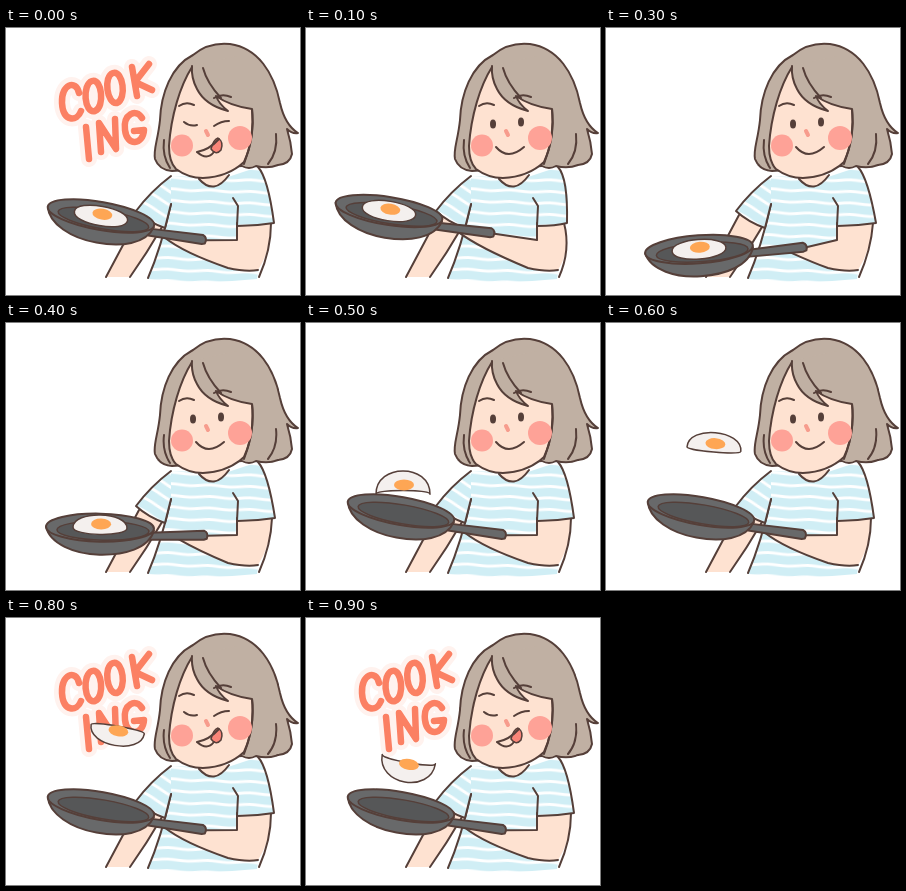
These frames come from a looping animation (294x267 px, 1000 ms). An HTML page:

```html
<!DOCTYPE html>
<html lang="en">
<head>
<meta charset="utf-8">
<title>Cooking</title>
<style>
  html, body { margin: 0; width: 100%; height: 100%; overflow: hidden; background: #fff; }
  svg { display: block; width: 100vw; height: 100vh; }
  svg * { stroke-linecap: round; stroke-linejoin: round; }
  path { fill: none; }
  .line { stroke: #553f39; stroke-width: 2; }
  .thin { stroke-width: 1.5; }
  .skin { fill: #fee2d1; }
  .hair { fill: #c0b0a3; }
  .steel { fill: #68696a; }
  .well { fill: #565758; }
  .blush { fill: #fea297; }
  .eye { fill: #553f39; }
  .tongue { fill: #fa8578; }
  .cloth { fill: url(#stripes); }
  .slant { fill: url(#slant); }
  .white { fill: #f4f0ee; }
</style>
</head>
<body>
<svg viewBox="0 0 294 267">
  <defs>
    <pattern id="stripes" width="40" height="11.5" patternUnits="userSpaceOnUse" patternTransform="rotate(2)">
      <path style="fill:#d0eef5" d="M0 0H40V12H0Z"/>
      <path d="M0 6Q10 4.5 20 6T40 6" stroke="#fff" stroke-width="3"/>
    </pattern>
    <pattern id="slant" href="#stripes" patternTransform="rotate(29)"/>
    <path id="word" d="M73 65C70 51 55 56 56 75C57 94 71 94 75 83
      M86 53C76 56 78 86 89 83C99 79 96 50 86 53
      M107 45C97 48 101 77 111 75C121 71 117 42 107 45
      M126 39L131 68M143 36L129 54L146 62
      M80 99L83 131M95 124L93 95L110 121L109 91
      M136 90C130 80 117 86 119 102C121 119 137 117 138 102L128 103"/>
  </defs>

  <!-- body -->
  <path class="skin" d="M133 186Q118 215 100 249H124Q140 225 158 199Z"/>
  <path class="line" d="M133 187Q118 215 100 249M124 249Q141 225 156 199"/>
  <path class="cloth" d="M165 148L193 149Q207 166 222 149L252 139Q262 150 262 175L251 251Q195 257 142 251Q155 220 163 185Z"/>
  <path class="line" d="M142 250Q155 220 165 176"/>
  <path class="line slant" d="M165 176L159 200Q142 194 130 183Q145 163 165 148"/>
  <path class="line skin" d="M193 147V151Q208 168 223 147"/>
  <path id="armFill" class="skin"/>
  <path id="armLine" class="line"/>
  <path id="sleeve" class="cloth"/>
  <path id="sleeveLine" class="line"/>

  <!-- head -->
  <path class="line hair" d="M187 27C200 16 214 15 224 16C252 20 268 45 274 75Q279 97 292 105Q286 106 281 101Q285 114 286 126Q284 136 272 137Q262 141 250 138Q243 142 236 138L166 143Q153 142 149 131C147 122 152 112 154 92C155 66 165 38 187 27Z"/>
  <path class="line skin" d="M186 39C174 58 165 88 163 118Q163 134 170 141Q182 150 197 150Q222 149 238 134Q249 110 246 80Z"/>
  <path class="hair" d="M186 38Q185 50 191 61Q199 77 222 83Q213 76 210 68Q224 78 247 81L254 60L230 28Z"/>
  <path class="line" d="M186 38Q185 50 191 61Q199 77 222 83Q213 76 210 68Q224 78 246 81Q249 108 238 136M197 40Q201 55 215 70M270 106Q272 124 262 136M158 112Q156 128 164 140"/>
  <circle class="blush" cx="176" cy="117.500" r="11"/>
  <circle class="blush" cx="234" cy="110" r="12"/>
  <path d="M200 103L202 107" stroke="#f79c8d" stroke-width="4"/>
  <path class="line" d="M173 78Q180 73 188 77M208 70Q216 65 225 69"/>
  <g id="smile">
    <ellipse class="eye" cx="187" cy="96" rx="3" ry="4.5"/>
    <ellipse class="eye" cx="215" cy="94" rx="3" ry="4.5"/>
    <path class="line" d="M190 119Q202 133 218 119"/>
  </g>
  <g id="yum">
    <path class="line thin tongue" d="M205 121Q207 112 212 110Q218 114 215 122Q210 128 205 121Z"/>
    <path class="line" d="M191 124Q201 133 208 124M191 124Q203 122 213 111M178 94Q184 99 191 97M208 98Q215 93 223 93"/>
  </g>

  <g id="pan">
    <path class="line steel" d="M50 4L104 1Q109 3 107 9L104 10L50 11Z"/>
    <path class="line steel" d="M-54 0C-50 17 -25 27 0 27C25 27 49 20 54 2Z"/>
    <ellipse class="line steel" rx="54" ry="14"/>
    <ellipse class="line thin well" cx="3" cy="3" rx="46" ry="9.500"/>
  </g>

  <g id="text" role="img" aria-label="COOKING">
    <use href="#word" stroke="#fff2ee" stroke-width="16"/>
    <use href="#word" stroke="#fb8063" stroke-width="6.500"/>
  </g>

  <g id="egg">
    <path id="white" class="line thin white"/>
    <ellipse id="yolk" cx="1" rx="10" ry="5.500" fill="#fea654"/>
  </g>
</svg>
<script>
const $ = id => document.getElementById(id);
const set = (id, attrs) => Object.entries(attrs).forEach(([k, v]) => $(id).setAttribute(k, v));
const show = (id, on) => $(id).style.display = on ? '' : 'none';
const place = (id, { x, y, deg }) => set(id, { transform: `translate(${x} ${y}) rotate(${deg})` });
const mix = (a, b, p) => a + (b - a) * p;

// grip: hand position along the handle; cuff: outer end of the right sleeve
const rest = { x: 95, y: 188, deg: 10, grip: 66, cuff: 268 };
const windup = { x: 83, y: 183, deg: 9, grip: 72, cuff: 261 };
const low = { x: 92, y: 238, deg: -6, grip: 104, cuff: 271 };

// The pan dips, then swings up to rest between steps 2 and 5.
function panAt(step) {
  if (step === 1) return windup;
  if (step === 0 || step > 4) return rest;
  const p = (step - 2) / 3, pose = {};
  for (const k in rest) pose[k] = mix(low[k], rest[k], k === 'deg' ? p * p : p);
  return pose;
}

// The egg rides in the pan, then flies in a parabola while its bend flips over.
function eggAt(step, pan) {
  if (step < 5) return { ...pan, bend: step === 4 ? 4 : 0 };
  const rise = step - 7.3;
  return {
    x: 97 + 17 * Math.sin((step - 5) / 4.5 * Math.PI),
    y: 105 + 12.5 * rise * rise,
    deg: 5 * Math.min(step - 5, 2),
    bend: 9 * (7 - step)
  };
}

function drawPan(pan) {
  const { x, y, deg, grip, cuff } = pan;
  const a = deg * Math.PI / 180, c = Math.cos(a), s = Math.sin(a);
  const at = (u, v) => `${x + u * c - v * s} ${y + u * s + v * c}`;
  const tip = at(106, 6), hem = 195;
  const under = `M${at(grip, 10)}Q${at(grip + 22, 22)} 222 240Q240 244 252 242`;
  place('pan', pan);
  set('armFill', { d: `${under}Q265 222 ${cuff - 3} ${hem}L231 ${hem}V212L${tip}Z` });
  set('armLine', { d: `${under}M${tip}L231 212V${hem}M${cuff - 3} ${hem}Q265 222 253 249` });
  set('sleeve', { d: `M252 139Q262 150 ${cuff} ${hem}Q250 198 231 198L232 167Z` });
  set('sleeveLine', { d: `M252 139Q262 150 ${cuff} ${hem}Q250 198 231 198L232 178L227 170` });
}

function drawEgg(egg) {
  const w = 27, top = -13 - egg.bend, bottom = 13 - egg.bend;
  place('egg', egg);
  set('white', { d: `M${-w} 0C${-w} ${top} ${w} ${top} ${w} 0C${w} ${bottom} ${-w} ${bottom} ${-w} 0Z` });
  set('yolk', { cy: -2 - egg.bend * 0.4 });
}

const start = performance.now();
function draw() {
  const step = Math.floor((performance.now() - start) % 1000 / 100);
  const happy = step === 0 || step > 6;
  const pan = panAt(step);
  drawPan(pan);
  drawEgg(eggAt(step, pan));
  show('text', happy);
  show('yum', happy);
  show('smile', !happy);
  requestAnimationFrame(draw);
}
draw();
</script>
</body>
</html>
```
